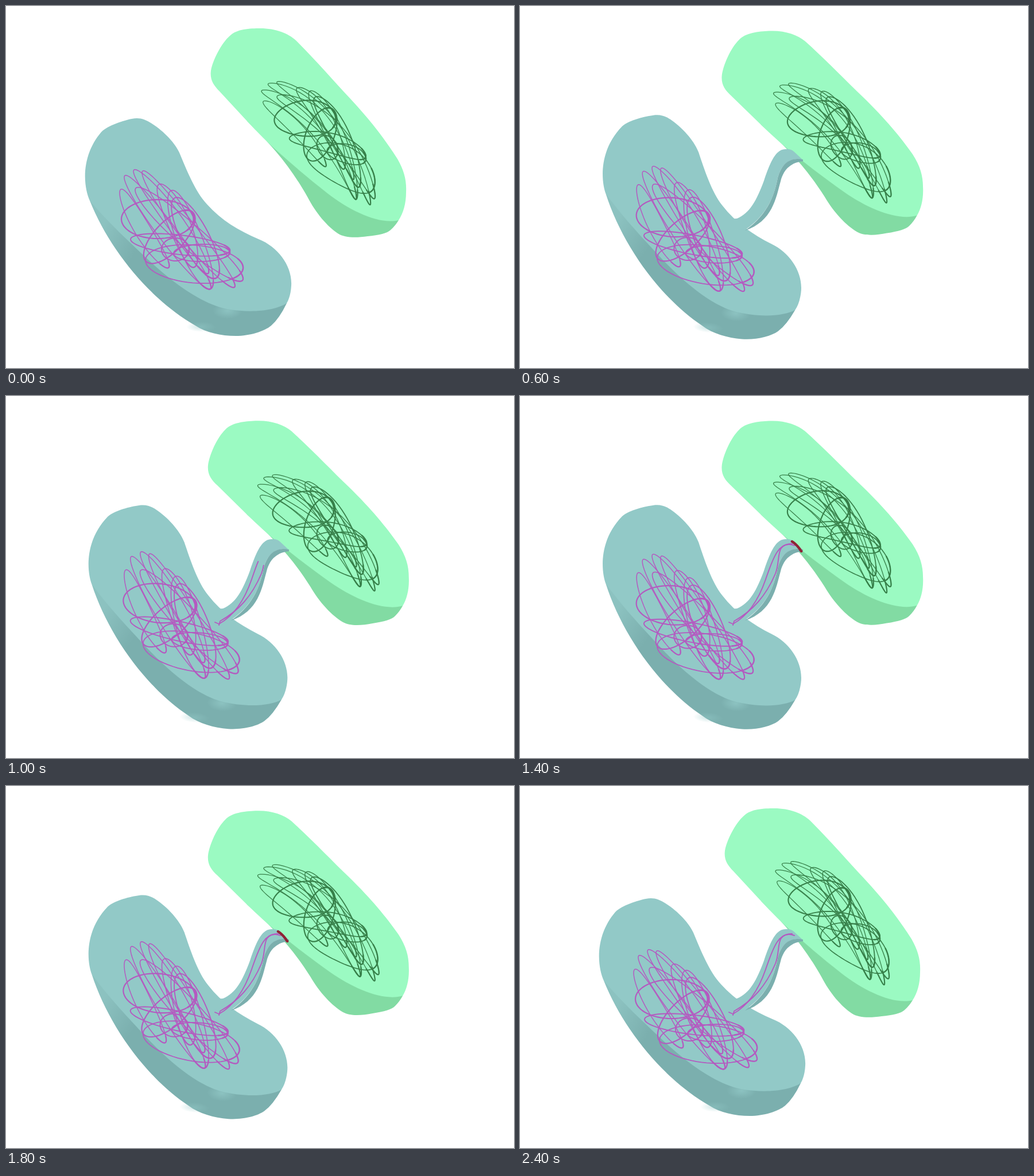
These frames come from a looping animation (885 by 632 pixels, 2.6 s). An HTML page:

```html
<!DOCTYPE html>
<html lang="en">
<head>
<meta charset="utf-8">
<title>Two cells</title>
<style>
html, body { margin: 0; width: 100%; height: 100%; overflow: hidden; background: #fff; }
svg { display: block; width: 100%; height: 100%; }
.line { fill: none; stroke-linecap: round; stroke-linejoin: round; }
</style>
</head>
<body>
<svg viewBox="0 0 885 632">
  <defs>
    <linearGradient id="side" gradientUnits="userSpaceOnUse" x1="158" y1="400" x2="222" y2="436">
      <stop offset="0" stop-color="#8cc2c0"/>
      <stop offset="1" stop-color="#7bafae"/>
    </linearGradient>
    <radialGradient id="glow">
      <stop offset="0" stop-color="#92c9c7" stop-opacity=".75"/>
      <stop offset="1" stop-color="#92c9c7" stop-opacity="0"/>
    </radialGradient>
    <linearGradient id="leaf" gradientUnits="userSpaceOnUse" x1="425" y1="205" x2="470" y2="255">
      <stop offset="0" stop-color="#8fe9b2"/>
      <stop offset="1" stop-color="#82dba3"/>
    </linearGradient>
  </defs>

  <g id="greenBody">
    <path fill="url(#leaf)" d="M420 201C465 245 495 280 525 333C540 362 560 385 578 397C590 405 610 405 630 402C650 400 664 397 670 391Q678 384 684 374L640 330L480 220Z"/>
    <path fill="#9bfac2" d="M357 113C360 95 375 65 390 52C402 40 425 39 443 39C470 39 492 48 505 60C540 95 570 130 600 162C640 205 665 240 682 267C694 288 698 305 697 325C697 345 692 362 684 374C650 382 600 358 560 327C515 291 465 250 420 201L372 149C361 138 355 128 357 113Z"/>
  </g>
  <g id="greenKnot" class="line" stroke="#37804a"></g>

  <g id="blueBody">
    <path fill="url(#side)" d="M146 340C180 425 250 512 330 558C348 570 375 576 400 576C425 576 450 568 462 558Q476 546 489 519L400 480L200 370Z"/>
    <ellipse cx="386" cy="532" rx="26" ry="14" fill="url(#glow)"/>
    <ellipse cx="340" cy="560" rx="26" ry="9" fill="url(#glow)" opacity=".6"/>
    <path fill="#92c9c7" d="M146 340C136 318 128 265 166 220C178 208 205 200 219 197C233 194 242 198 252 204C275 218 295 240 302 256C314 285 330 325 350 346C375 374 405 392 440 407C475 421 499 455 497 488Q496 507 489 519C470 531 430 537 385 529C340 520 290 482 250 445C215 412 180 380 146 340Z"/>
  </g>

  <g id="tubes">
    <g>
      <path fill="#92c9c7" d="M365 372L378 371C390 368 398 359 402 354C410 350 424 352 425 360Q416 376 393 391L370 390Z"/>
      <path fill="#7bafae" d="M425 360Q416 376 392 392C410 388 424 379 425 371Z"/>
    </g>
    <g>
      <path fill="#92c9c7" d="M365 372L378 371C400 362 412 340 420 320C426 302 444 300 448 310C444 335 430 366 393 391L370 390Z"/>
      <path fill="#7bafae" d="M448 310C444 335 430 366 392 392C432 380 449 342 448 310Z"/>
    </g>
    <g>
      <path fill="#92c9c7" d="M365 372L378 371C400 362 412 340 425 305C435 275 445 250 462 250Q471 249 477 254L492 268C470 264 456 275 449 300C444 325 435 362 392 391L370 390Z"/>
      <path fill="#7bafae" d="M493 268C470 263 456 275 449 300C444 325 435 362 392 392C440 376 446 335 454 306C460 283 474 273 493 271Z"/>
    </g>
  </g>
  <g id="blueKnot" class="line" stroke="#b45ac0"></g>
  <g id="thread" class="line" stroke="#b45ac0" stroke-width="1.9">
    <path pathLength="1" d="M364 395L371 398C400 382 417 352 428 320C440 285 451 250 478 261"/>
    <path pathLength="1" d="M371 400L373 393C405 375 428 350 445 310C455 285 443 258 474 258"/>
  </g>
  <path id="stop" class="line" stroke="#8e2434" stroke-width="4.5" d="M474 254Q483 260 490 271"/>
</svg>
<script>
const $ = id => document.getElementById(id);

function addLine(group, points, width) {
  const path = document.createElementNS('http://www.w3.org/2000/svg', 'path');
  path.setAttribute('d', 'M' + points.join('L'));
  path.setAttribute('stroke-width', width);
  $(group).appendChild(path);
}

// Oval loops: tip, opposite tip, half breadth, line width
const loops = [
  [200,320, 283,457, 14, 1.5],
  [207,296, 356,494, 16, 1.5],
  [223,286, 352,467, 15, 1.5],
  [238,288, 398,491, 16, 1.5],
  [226,318, 412,479, 21, 1.6],
  [267,311, 328,456, 19, 1.6],
  [288,322, 356,494, 22, 1.6],
  [201,372, 327,372, 34, 2.2],
  [217,407, 390,427, 17, 1.9],
  [243,443, 413,458, 33, 1.8],
  [244,446, 325,360, 26, 2.2],
  [294,335, 366,475, 24, 1.9],
  [271,425, 319,425, 20, 2],
  [292,432, 390,430, 15, 1.9]
];

// Part of a loop between two angles, with a slight sag
function arc([x1, y1, x2, y2, breadth], sag, from, to) {
  const hx = (x2 - x1) / 2, hy = (y2 - y1) / 2, half = Math.hypot(hx, hy);
  const points = [];
  for (let i = 0; i <= 60; i++) {
    const a = from + (to - from) * i / 60;
    const u = Math.cos(a), v = Math.sin(a);
    const off = (breadth * v + sag * v * v) / half;
    points.push([x1 + hx * (1 + u) - hy * off, y1 + hy * (1 + u) + hx * off]);
  }
  return points;
}

// Bends the knot into the straighter shape of the other cell
function bend([x, y]) {
  const t = (x + y - 690) ** 2, s = y - x - 40;
  return [x + 246 + 0.22 * s - 0.00053 * t, y - 179 + 0.00088 * t];
}

loops.forEach((loop, i) => {
  const sag = i < 7 ? 5 * Math.sin(i * 2 + 1) : 0;
  const thin = loop[5];
  const whole = arc(loop, sag, 0, Math.PI * 2);
  const heavy = arc(loop, sag, -0.5, 0.6);
  addLine('blueKnot', whole, thin);
  addLine('blueKnot', heavy, thin + 0.7);
  addLine('greenKnot', whole.map(bend), thin * 1.3 - 0.7);
  addLine('greenKnot', heavy.map(bend), thin + 0.6);
});

// Turns in degrees: blue body, green body, blue knot, green knot; then knot shift
const poses = {
  rest: [0, 0, 0, 0, 0, 0],
  half: [1.9, -1.4, 3, -2.2, 0, -3],
  full: [3.8, -2.75, 5.9, -4.3, 1, -6],
  over: [4, -2.95, 4.4, -2.2, 0, -3.5]
};

const STEP = 200;
const COUNT = 13;
const cycle = ['rest', 'full', 'half', 'over'];
const tubes = [...$('tubes').children];
const threads = [...$('thread').children];
const show = (el, on) => el.setAttribute('visibility', on ? 'visible' : 'hidden');

function turn(id, angle, x, y, dx = 0, dy = 0) {
  $(id).setAttribute('transform', `translate(${dx} ${dy}) rotate(${angle} ${x} ${y})`);
}

function draw(index) {
  // The last steps go rest, over, rest
  const name = index < 10 ? cycle[index % 4] : index === 11 ? 'over' : 'rest';
  const [blue, green, blueKnot, greenKnot, dx, dy] = poses[name];
  const tube = Math.min(index, 3);
  const length = Math.max(0, Math.min(1, (index - 3) * 0.36));
  const lift = length > 0 ? 1 : 0;
  turn('blueBody', blue, 316, 386);
  turn('greenBody', green, 528, 222);
  turn('blueKnot', blueKnot, 306, 390, dx * lift, dy * lift);
  turn('greenKnot', greenKnot, 548, 240);
  tubes.forEach((el, i) => show(el, i + 1 === tube));
  threads.forEach(el => el.setAttribute('stroke-dasharray', `${length} 2`));
  show($('thread'), lift);
  show($('stop'), index >= 7 && index % 2);
}

const start = performance.now();
let last = -1;
function tick() {
  const index = Math.floor((performance.now() - start) / STEP) % COUNT;
  if (index !== last) draw(last = index);
  requestAnimationFrame(tick);
}
tick();
</script>
</body>
</html>
```
